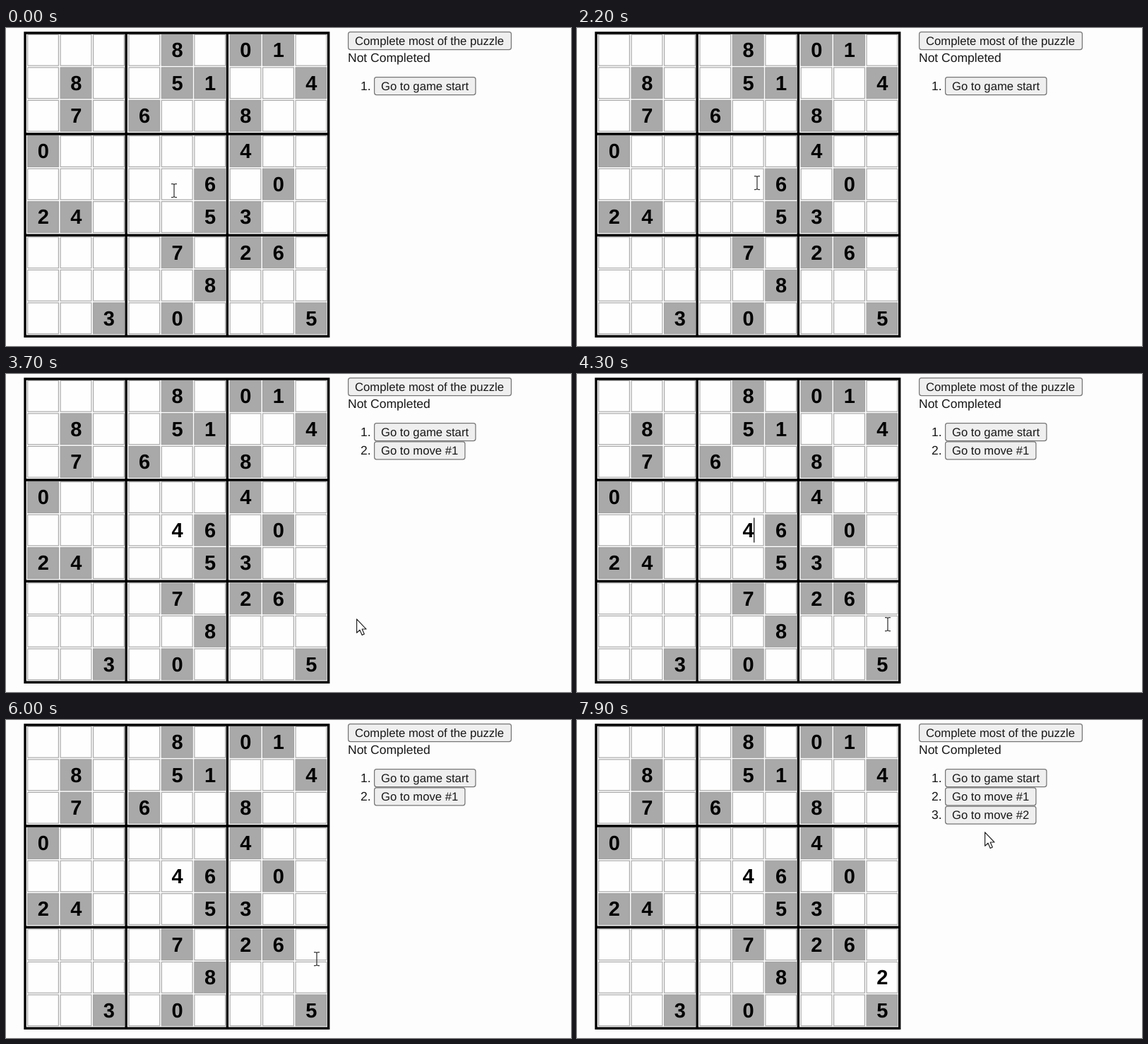
Write an HTML page that moves like this. It is 800 by 450 pixels and loops after 8 s.

```html
<!DOCTYPE html>
<html lang="en">
<head>
<meta charset="utf-8">
<title>Sudoku</title>
<style>
  html, body { margin: 0; width: 100%; height: 100%; overflow: hidden; background: #fdfdfe; }
  svg { display: block; width: 800px; height: 450px; font-family: "Liberation Sans", Arial, sans-serif; }
  text { fill: #181818; text-rendering: geometricPrecision; }
  .digit { font-size: 29px; font-weight: bold; text-anchor: middle; fill: #000; }
  .label { font-size: 17.5px; }
  .button text { font-size: 16.67px; }
  .button rect { fill: #efefef; stroke: #767676; stroke-width: 1.25; }
  .frame { fill: none; stroke: #000; stroke-width: 3.4; }
</style>
</head>
<body>
<svg id="stage" viewBox="0 0 800 450"></svg>
<script>
const LOOP = 8000, STEP = 100, BLINK = 500;
const CELL = 45, HIT = 20.7;
const PUZZLE = [
  "....8.01.", ".8..51..4", ".7.6..8..",
  "0.....4..", ".....6.0.", "24...53..",
  "....7.26.", ".....8...", "..3.0...5"
];

const MOVES = [
  { row: 4, col: 4, value: 4, time: 2900 },
  { row: 7, col: 8, value: 2, time: 7400 }
];

// Each click or key press restarts the caret; a click on a given cell removes it
const FOCUS = [
  { from: 100, to: 1300, move: MOVES[0] },
  { from: 1700, to: MOVES[0].time, move: MOVES[0] },
  { from: MOVES[0].time, to: 4500, move: MOVES[0] },
  { from: 4500, to: MOVES[1].time, move: MOVES[1] },
  { from: MOVES[1].time, to: LOOP, move: MOVES[1] }
];

// Pointer gestures; the pointer rests between them
const START = { x: 238, y: 230 };
const GESTURES = [
  { from: 0, to: 200, x: 238, y: 207 },
  { from: 900, to: 1100, x: 263, y: 226 },
  { from: 1300, to: 1600, x: 261, y: 223 },
  { from: 1700, to: 1800, x: 255, y: 219 },
  { from: 3200, to: 3500, x: 700, y: 240 },
  { from: 3500, to: 3700, x: 496, y: 346 },
  { from: 3700, to: 4100, x: 449, y: 370 },
  { from: 4100, to: 4300, x: 440, y: 354 },
  { from: 4500, to: 4900, x: 466, y: 340 },
  { from: 5200, to: 6000, x: 440, y: 338 },
  { from: 6500, to: 7100, x: 441, y: 381 },
  { from: 7400, to: 7900, x: 577, y: 158 }
];

const offset = i => 46.5 * i + 3.75 * Math.floor(i / 3);
const centreX = col => 52.5 + offset(col);
const centreY = row => 31.3 + offset(row);

const digit = (row, col, value) =>
  `<text class="digit" x="${centreX(col) + .2}" y="${centreY(row) + 9.8}">${value}</text>`;

const cell = (row, col, value) => {
  const given = value !== ".", side = CELL - 1.2;
  return `<rect x="${centreX(col) - side / 2}" y="${centreY(row) - side / 2}" width="${side}" height="${side}"
    fill="${given ? "#a9a9a9" : "#fefefe"}" stroke="${given ? "#a0a0a0" : "#aaa"}" stroke-width="1.2"/>`
    + (given ? digit(row, col, value) : "");
};

const button = (x, y, width, text) => `<g class="button">
  <rect x="${x + .6}" y="${y + .6}" width="${width - 1.2}" height="25" rx="3"/>
  <text x="${x + 10}" y="${y + 18.9}">${text}</text></g>`;

const label = (x, y, text) => `<text class="label" x="${x}" y="${y}">${text}</text>`;

const listItem = (index, width, text) => {
  const y = 69 + 26.2 * index;
  return label(502, y + 18.9, `${index + 1}.`) + button(521, y, width, text);
};

function board() {
  const cells = PUZZLE.map((line, row) =>
    [...line].map((value, col) => cell(row, col, value)).join("")).join("");
  const lines = [2.5, 5.5].map(i => {
    const edge = 46.5 * i + 3.75 * Math.floor(i / 3) + 1.9;
    return `M${edge + 52} 7V436M27 ${edge + 31.8}H457`;
  }).join("");
  return cells + `<path class="frame" d="M27 7H456.7V436.3H27Z${lines}"/>`;
}

const stage = document.getElementById("stage");
stage.innerHTML = board()
  + button(484, 5, 232, "Complete most of the puzzle")
  + label(484, 47.8, "Not Completed")
  + listItem(0, 144.5, "Go to game start")
  + MOVES.map((move, i) => `<g class="move">${digit(move.row, move.col, move.value)}
      ${listItem(i + 1, 129.5, `Go to move #${i + 1}`)}</g>`).join("")
  + `<path id="caret" stroke="#111" stroke-width="1.25" d="M0 -17.5V17.5"/>
     <path id="beam" fill="none" stroke="#333" stroke-width="1.25"
       d="M-4 -9.5H-2Q0 -9.5 0 -8Q0 -9.5 2 -9.5H4M0 -8V8M-4 9.5H-2Q0 9.5 0 8Q0 9.5 2 9.5H4"/>
     <path id="arrow" fill="#fff" stroke="#222" stroke-width="1.2" stroke-linejoin="round"
       d="M.6 .8V20.2L5 16.2L8.2 23.4L11.3 22L8.2 15H14Z"/>`;

const caret = document.getElementById("caret");
const beam = document.getElementById("beam");
const arrow = document.getElementById("arrow");
const moveGroups = [...stage.querySelectorAll(".move")];

const show = (node, visible) => node.setAttribute("visibility", visible ? "visible" : "hidden");
const place = (node, x, y) => node.setAttribute("transform", `translate(${x} ${y})`);
const ease = k => k * k * (3 - 2 * k);

function pointerAt(time) {
  let { x, y } = START;
  for (const gesture of GESTURES) {
    if (time <= gesture.from) break;
    const k = ease(Math.min(1, (time - gesture.from) / (gesture.to - gesture.from)));
    x += (gesture.x - x) * k;
    y += (gesture.y - y) * k;
  }
  return { x, y };
}

// The pointer is a text beam inside cells that can be edited
const overEditable = (x, y) => PUZZLE.some((line, row) => [...line].some((value, col) =>
  value === "." && Math.abs(x - centreX(col)) < HIT && Math.abs(y - centreY(row)) < HIT));

function drawCaret(time) {
  const focus = FOCUS.find(({ from, to }) => time >= from && time < to);
  show(caret, focus && Math.floor((time - focus.from) / BLINK) % 2 === 0);
  if (!focus) return;
  const { row, col, time: typed } = focus.move;
  place(caret, centreX(col) + (time < typed ? 1 : 8.5), centreY(row));
}

function drawPointer(time) {
  const { x, y } = pointerAt(time);
  const editable = overEditable(x, y);
  show(beam, editable);
  show(arrow, !editable);
  place(editable ? beam : arrow, x, y);
}

function draw(now) {
  const time = Math.floor(now % LOOP / STEP) * STEP;
  moveGroups.forEach((group, i) => show(group, time >= MOVES[i].time));
  drawCaret(time);
  drawPointer(time);
}

let startTime;
function tick(now) {
  startTime ??= now;
  draw(now - startTime);
  requestAnimationFrame(tick);
}
draw(0);
requestAnimationFrame(tick);
</script>
</body>
</html>
```
